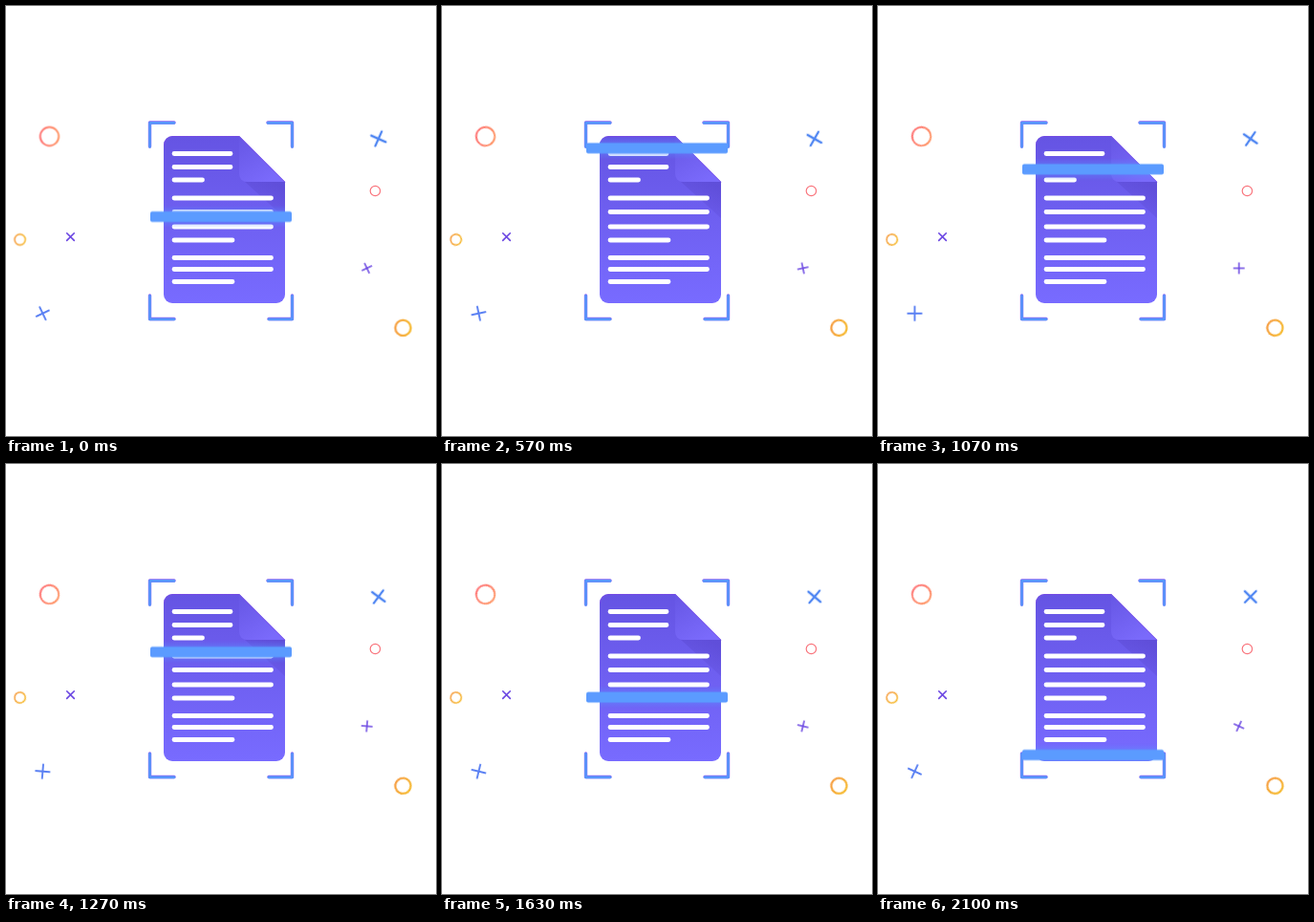
These frames come from a looping animation (450 px wide and 450 px high, 2130 ms). An HTML page:

```html
<!DOCTYPE html>
<html lang="en">
<head>
<meta charset="utf-8">
<title>Document scan</title>
<style>
  html, body { margin: 0; width: 100%; height: 100%; overflow: hidden; background: #fff; }
  svg { display: block; width: 100vw; height: 100vh; }

  /* 64 steps per loop; the small delay lines them up with 10 ms ticks */
  .scan, .spin { animation: scan 2130ms -4ms infinite; }
  .spin { animation-name: spin; animation-timing-function: steps(64); }

  @keyframes scan {
    0% { transform: translateY(220.5px); animation-timing-function: steps(22); }
    34.375% { transform: translateY(127.7px); animation-timing-function: steps(42); }
    100% { transform: translateY(308.8px); }
  }
  @keyframes spin {
    from { transform: rotate(var(--from)); }
    to { transform: rotate(var(--to)); }
  }
  .wide { --from: -25.5deg; --to: 25.5deg; }
  .slow { --from: 24deg; --to: 45deg; }
  .ring { --from: 0deg; --to: 50deg; fill: none; }
  .cross { fill: none; stroke-linecap: round; }
</style>
</head>
<body>
<svg viewBox="0 0 450 450">
  <defs>
    <linearGradient id="paper" x1="0" y1="0" x2="0" y2="1">
      <stop offset="0" stop-color="#6554e3"/>
      <stop offset="1" stop-color="#786bff"/>
    </linearGradient>
    <linearGradient id="fold" x1="0" y1="0" x2="0.6" y2="1">
      <stop offset="0" stop-color="#6656e4"/>
      <stop offset="1" stop-color="#7a6afb"/>
    </linearGradient>
    <linearGradient id="shade" gradientUnits="userSpaceOnUse" x1="280" y1="184" x2="268" y2="206">
      <stop offset="0" stop-color="#5b49d2" stop-opacity=".7"/>
      <stop offset="1" stop-color="#5b49d2" stop-opacity=".3"/>
    </linearGradient>
    <linearGradient id="glow" x1="0" y1="0" x2="0" y2="1">
      <stop offset="0" stop-color="#5b8cff" stop-opacity="0"/>
      <stop offset=".35" stop-color="#5b8cff" stop-opacity=".5"/>
      <stop offset=".65" stop-color="#5b8cff" stop-opacity=".5"/>
      <stop offset="1" stop-color="#5b8cff" stop-opacity="0"/>
    </linearGradient>
    <linearGradient id="coral">
      <stop offset="0" stop-color="#ff7474"/>
      <stop offset="1" stop-color="#ff9566"/>
    </linearGradient>
    <linearGradient id="amber">
      <stop offset="0" stop-color="#f69f42"/>
      <stop offset="1" stop-color="#f6b92f"/>
    </linearGradient>
    <path id="sheet" d="M174 136H244L292 184V302a9 9 0 0 1-9 9H174a9 9 0 0 1-9-9V145a9 9 0 0 1 9-9Z"/>
    <clipPath id="inside"><use href="#sheet"/></clipPath>
    <path id="corners" d="M150.5 147V122H176M274 122H299.5V147M150.5 303V327.5H176M275 327.5H299.5V303"/>
  </defs>

  <g fill="none" stroke-linecap="round" stroke-linejoin="round">
    <use href="#corners" stroke="#8b62f2" stroke-width="3.4"/>
    <use href="#corners" stroke="#5796fb" stroke-width="2.6" y=".4"/>
  </g>

  <use href="#sheet" fill="url(#paper)"/>
  <path d="M250 184H292V222Z" fill="url(#shade)"/>
  <path d="M244 136L292 184H252a8 8 0 0 1-8-8Z" fill="url(#fold)"/>
  <path d="M165.5 146a9.5 9.5 0 0 1 9-9.5H244L292 184.5" fill="none" stroke="#7d45e6" stroke-opacity=".6"/>

  <path stroke="#fff" stroke-width="4.8" stroke-linecap="round" d="M176 154.5H235M176 168.5H235M176 182H205.5
    M176 201H277.5M176 215.5H277.5M176 231H277.5M176 245H237
    M176 263.5H277.5M176 275.5H277.5M176 288.5H237"/>

  <g clip-path="url(#inside)">
    <rect class="scan" x="160" y="-12" width="140" height="24" fill="url(#glow)"/>
  </g>
  <rect class="scan" x="151" y="-5.5" width="148" height="11" rx="2" fill="#5b9bff"/>

  <g transform="translate(45.5 136.5)"><circle class="spin ring" r="9.7" stroke="url(#coral)" stroke-width="2"/></g>
  <g transform="translate(386.4 193.5)"><circle class="ring" r="5.2" stroke="#f9757d" stroke-width="1.2"/></g>
  <g transform="translate(14.6 244.5)"><circle class="spin ring" r="5.6" stroke="url(#amber)" stroke-width="1.6"/></g>
  <g transform="translate(415.5 336.8)"><circle class="spin ring" r="8.1" stroke="url(#amber)" stroke-width="2.3"/></g>

  <g transform="translate(389.8 139)"><path class="spin slow cross" d="M-8.3 0H8.3M0-8.3V8.3" stroke="#4f86f2" stroke-width="2.3"/></g>
  <g transform="translate(38.4 321.7)"><path class="spin wide cross" d="M-7.2 0H7.2M0-7.2V7.2" stroke="#5a80f3" stroke-width="1.9"/></g>
  <g transform="translate(377.7 274.4)"><path class="spin wide cross" d="M-5.4 0H5.4M0-5.4V5.4" stroke="#6a45e2" stroke-width="1.5"/></g>
  <g transform="translate(67.5 241.6)"><path class="cross" d="M-3.8-3.8L3.8 3.8M3.8-3.8L-3.8 3.8" stroke="#6a45e2" stroke-width="1.6"/></g>
</svg>
</body>
</html>
```
